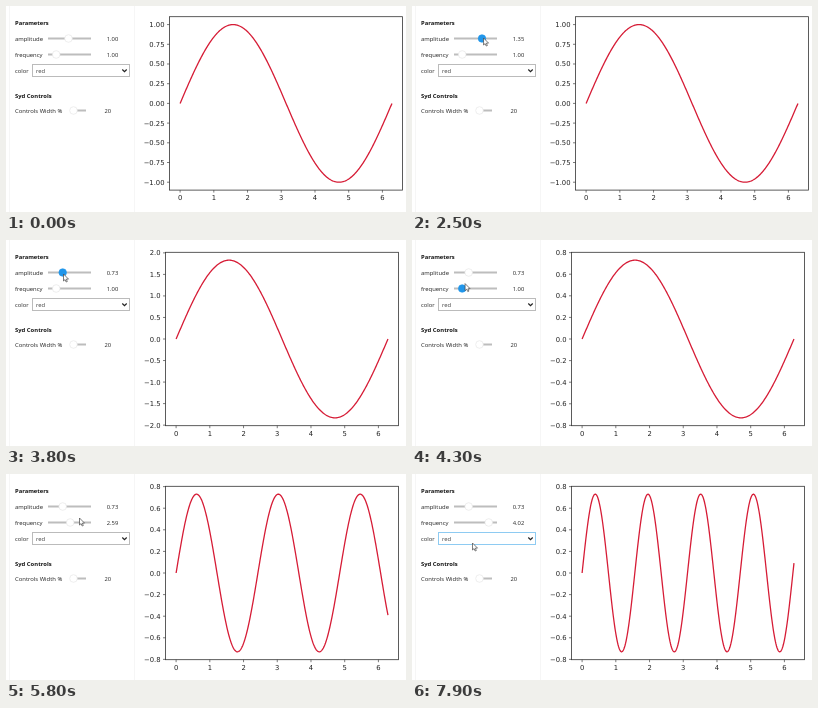
An HTML page with a canvas that plays this animation: 400x206 px, repeating every 8 s.

```html
<!DOCTYPE html>
<html lang="en">
<head>
<meta charset="utf-8">
<title>Sine wave controls</title>
<style>
html, body { margin: 0; width: 100%; height: 100%; overflow: hidden; background: #fff; }
canvas { display: block; width: 400px; height: 206px; }
</style>
</head>
<body>
<canvas id="stage" width="400" height="206"></canvas>
<script>
const ctx = document.getElementById('stage').getContext('2d');
const LOOP = 8000, STEP = 100, MOVE = 500, REDRAW_DELAY = 200;
const UI = '"Open Sans", "Noto Sans", sans-serif';
const PLOT = '"DejaVu Sans", sans-serif';
const AMP_Y = 32.5, FREQ_Y = 48.5;

// Pointer moves; those with amp or freq drag that slider along
const moves = [
  { at: 1700, x: 64, y: 32 },
  { at: 2290, x: 82, y: 32, amp: 1.83 },
  { at: 3200, x: 57.5, y: 34, amp: .73 },
  { at: 3900, x: 52, y: 46 },
  { at: 4450, x: 66, y: 45, freq: 2.59 },
  { at: 5250, x: 73.5, y: 44 },
  { at: 5850, x: 67, y: 47 },
  { at: 6100, x: 79, y: 51, freq: 4.02 },
  { at: 7300, x: 60.5, y: 69 }
];

// With whole = true a move counts only once it is finished
function stateAt(t, whole = false) {
  const s = { x: 80, y: -10, amp: 1, freq: 1 };
  for (const { at, ...goal } of moves) {
    let p = Math.min(1, Math.max(0, (t - at) / MOVE));
    if (whole) p = Math.floor(p);
    for (const key in goal) s[key] += (goal[key] - s[key]) * p;
  }
  return s;
}

function text(str, x, y, font, align = 'left', color = '#222') {
  ctx.font = font;
  ctx.textAlign = align;
  ctx.fillStyle = color;
  ctx.fillText(str, x, y);
}

function line(points, color, width) {
  ctx.beginPath();
  points.forEach(([x, y]) => ctx.lineTo(x, y));
  ctx.strokeStyle = color;
  ctx.lineWidth = width;
  ctx.stroke();
}

function slider(label, y, x0, x1, knob, value, valueX, pointer) {
  const active = Math.abs(pointer.x - knob) < 5 && Math.abs(pointer.y - y) < 5;
  text(label, 9, y + 2, '5.9px ' + UI);
  line([[x0, y], [x1, y]], '#bdbdbd', 2);
  ctx.beginPath();
  ctx.arc(knob, y, 3.8, 0, 7);
  ctx.fillStyle = active ? '#2196ea' : '#fff';
  ctx.fill();
  ctx.strokeStyle = active ? '#2196ea' : '#e2e2e2';
  ctx.lineWidth = .6;
  ctx.stroke();
  text(value, valueX, y + 2, '5.8px ' + UI, 'center');
}

function controls(s) {
  for (const x of [3.5, 128.5]) line([[x, 0], [x, 206]], '#f6f6f6', 1);
  text('Parameters', 9, 19, 'bold 5.8px ' + UI, 'left', '#111');
  slider('amplitude', AMP_Y, 42, 85, 41 + 21.5 * s.amp, s.amp.toFixed(2), 106.5, s);
  slider('frequency', FREQ_Y, 42, 85, 41.4 + 8.8 * s.freq, s.freq.toFixed(2), 106.5, s);

  text('color', 9, 66.5, '5.8px ' + UI);
  ctx.strokeStyle = s.y > 58 ? '#8ecbf2' : '#bbb';
  ctx.lineWidth = 1;
  ctx.strokeRect(26.5, 58.5, 97, 12);
  text('red', 30, 66.7, '5.9px ' + UI, 'left', '#444');
  line([[116.3, 63.5], [118.5, 65.7], [120.7, 63.5]], '#222', 1.2);

  text('Syd Controls', 9, 92, 'bold 5.9px ' + UI, 'left', '#111');
  slider('Controls Width %', 104.5, 64, 80, 67.5, '20', 101.8, s);
}

function plot({ amp, freq }) {
  // Finest step that gives at most four ticks on each side
  const ticks = step => Math.floor(1.1 * amp / step);
  const step = [.2, .25, .5].find(d => ticks(d) <= 4);
  const digits = step === .25 ? 2 : 1;
  const count = ticks(step);

  // Longer tick labels push the axes to the right
  const left = 155.5 + 4 * digits, mid = 100.6 - 1.6 * digits;
  const half = 86.7, scale = half / 1.1 / amp;
  const unit = 33.72, zero = left + 10.6, bottom = mid + half;
  const font = '6.8px ' + PLOT;

  for (let i = -count; i <= count; i++) {
    const y = mid - i * step * scale;
    const label = (i < 0 ? '\u2212' : '') + Math.abs(i * step).toFixed(digits);
    line([[left - 2.5, y], [left, y]], '#222', .6);
    text(label, left - 5, y + 2.5, font, 'right');
  }
  for (let i = 0; i <= 6; i++) {
    const x = zero + i * unit;
    line([[x, bottom], [x, bottom + 2.5]], '#222', .6);
    text(i, x, bottom + 9.8, font, 'center');
  }

  const curve = [];
  for (let i = 0; i <= 400; i++) {
    const x = i / 400 * 2 * Math.PI;
    curve.push([zero + x * unit, mid - amp * Math.sin(freq * x) * scale]);
  }
  ctx.lineJoin = 'round';
  line(curve, '#d61c36', 1.3);
  ctx.lineJoin = 'miter';
  ctx.strokeStyle = '#333';
  ctx.lineWidth = .8;
  ctx.strokeRect(left, mid - half, 233, 2 * half);
}

function cursor({ x, y }) {
  const arrow = [[0, 0], [0, 7], [1.6, 5.6], [2.7, 8], [3.8, 7.5], [2.8, 5.2], [5, 5.1]];
  ctx.beginPath();
  arrow.forEach(([dx, dy]) => ctx.lineTo(x + dx, y + dy));
  ctx.closePath();
  ctx.fillStyle = '#fff';
  ctx.fill();
  ctx.strokeStyle = '#444';
  ctx.lineWidth = .7;
  ctx.stroke();
}

function draw(now) {
  const t = Math.floor(now % LOOP / STEP) * STEP;
  const state = stateAt(t);
  ctx.fillStyle = '#fff';
  ctx.fillRect(0, 0, 400, 206);
  controls(state);
  plot(stateAt(t - REDRAW_DELAY, true));
  cursor(state);
}

const start = performance.now();
function tick() {
  draw(performance.now() - start);
  requestAnimationFrame(tick);
}
tick();
</script>
</body>
</html>
```
